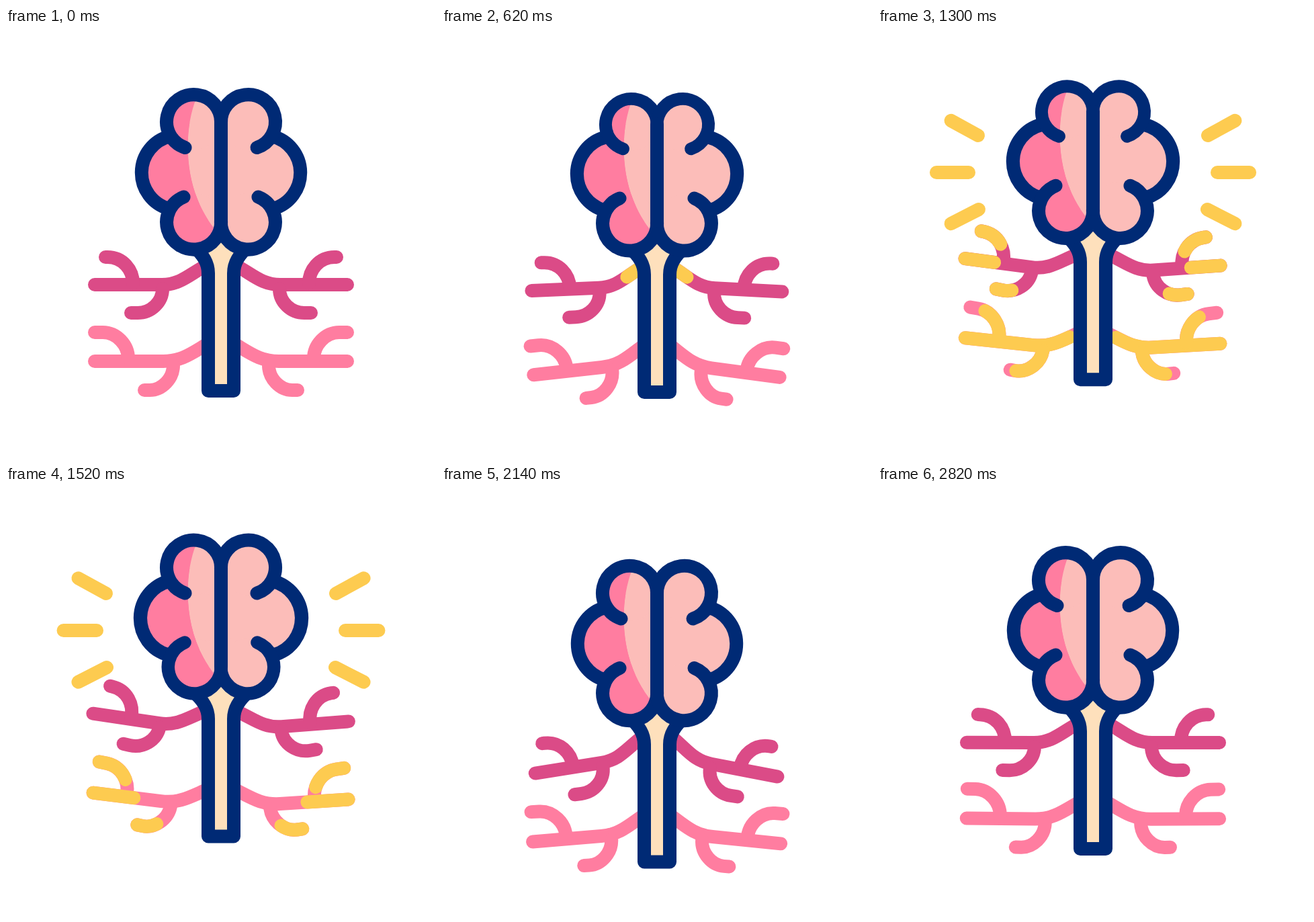
An HTML page for the animation above (3.2 s loop, 640 by 640 pixels).

```html
<!DOCTYPE html>
<html lang="en">
<head>
<meta charset="utf-8">
<title>Nervous system</title>
<style>
  html, body { margin: 0; height: 100%; overflow: hidden; background: #fff; }
  svg { display: block; width: 100vw; height: 100vh; }
  .line { fill: none; stroke-width: 20; stroke-linecap: round; stroke-linejoin: round; }
  .navy { stroke: #002a75; }
  .gold { stroke: #fdcb50; }
</style>
</head>
<body>
<svg viewBox="0 0 640 640">
  <defs>
    <clipPath id="shade"><path d="M150 80H290L283 105C263 155 263 245 314 303V350H150Z"/></clipPath>
    <g id="flesh">
      <path d="M262 141H320V286H262Z"/>
      <circle class="mid" cx="258" cy="215" r="56"/>
      <circle class="top" cx="279.5" cy="141" r="40.5"/>
      <circle class="low" cx="279.5" cy="286" r="40.5"/>
    </g>
    <g id="outline" class="line navy">
      <path class="mid" d="M244 161A56 56 0 0 0 242 269"/>
      <path class="top" d="M320 141A40.5 40.5 0 1 0 266.5 178"/>
      <path class="low" d="M320 286A40.5 40.5 0 1 1 264.5 251.5"/>
    </g>
  </defs>
  <g id="rays" class="line gold"></g>
  <g id="body">
    <g id="nerves" class="line"></g>
    <path d="M301 540V365C301 350 294 338 278 324L320 300L362 324C346 338 339 350 339 365V540Z" fill="#fee0bc"/>
    <path class="line navy" d="M278 324C294 338 301 350 301 365V540H339V365C339 350 346 338 362 324"/>
    <g fill="#fcbdb9">
      <use href="#flesh"/>
      <use href="#flesh" transform="matrix(-1 0 0 1 640 0)"/>
    </g>
    <use href="#flesh" fill="#ff7da0" clip-path="url(#shade)"/>
    <use href="#outline"/>
    <use href="#outline" transform="matrix(-1 0 0 1 640 0)"/>
    <path class="line navy" d="M320 141V286"/>
  </g>
</svg>
<script>
const LOOP = 3200;
const $ = id => document.getElementById(id);
const ramp = (t, from, span) => Math.min(1, Math.max(0, (t - from) / span));
const mirror = (flip, dy = 0) => flip ? `matrix(-1 0 0 1 640 ${dy})` : `translate(0 ${dy})`;
const rotate = (angle, x, y) => `rotate(${-angle * 180 / Math.PI} ${x} ${y})`;

function add(parent, tag, attrs = {}) {
  const node = document.createElementNS('http://www.w3.org/2000/svg', tag);
  for (const key in attrs) node.setAttribute(key, attrs[key]);
  return parent.appendChild(node);
}

// Smooth curve through [time, value] keys, flat at every turning point
function curve(keys) {
  const last = keys.length - 1;
  const slope = i => (keys[i + 1][1] - keys[i][1]) / (keys[i + 1][0] - keys[i][0]);
  const tangent = keys.map((_, i) => {
    if (i === 0 || i === last) return 0;
    const a = slope(i - 1), b = slope(i);
    return a * b > 0 ? 2 * a * b / (a + b) : 0;
  });
  return t => {
    if (t <= keys[0][0]) return keys[0][1];
    if (t >= keys[last][0]) return keys[last][1];
    const i = keys.findIndex(key => key[0] > t) - 1;
    const [[t0, a], [t1, b]] = [keys[i], keys[i + 1]];
    const h = t1 - t0, u = (t - t0) / h, v = 1 - u;
    return v * v * ((1 + 2 * u) * a + u * h * tangent[i])
         + u * u * ((1 + 2 * v) * b - v * h * tangent[i + 1]);
  };
}

// Dip, spring up, hang, drop and settle
const bob = curve([[220, 0], [430, 20], [620, 2], [1000, -12], [1300, -16.7],
                   [1760, -19.5], [2120, 20], [2390, -6], [2820, 0]]);

// Nerves trail the body; the right side swings less upward and more downward
function swing(t, { lag, sway }, flip) {
  const angle = sway * bob(t - lag);
  return flip ? angle * (angle < 0 ? .53 : 1.2) : angle;
}
const curl = t => Math.min(0, .005 * bob(t - 240));

// Strands: root x, root y, rest of the path, signal delay, signal travel time
const upper = {
  color: '#db4b87', dy: 0, start: 550, lag: 40, sway: .008,
  strands: [
    [302, 351, 'C272 367 260 382 232 382H132', 0, 400],
    [189, 380, 'C189 360 174 341 151 341h-3', 272, 320],
    [233, 388, 'C233 408 216 424 196 424h-10', 172, 370]
  ]
};
const lower = {
  color: '#ff7da0', dy: 114, start: 810, lag: 125, sway: .007,
  strands: [
    [302, 355, 'C276 370 262 382 234 382H132', 0, 400],
    [182, 378, 'C182 358 165 339 144 339h-12', 272, 320],
    [249, 388, 'C249 408 232 425 214 425h-8', 172, 370]
  ]
};

const nerves = [];
for (const kind of [upper, lower])
  for (const flip of [false, true]) {
    const side = add($('nerves'), 'g', { transform: mirror(flip, kind.dy) });
    const group = add(side, 'g');
    const draw = attrs => kind.strands.map(([x, y, d]) =>
      add(group, 'path', { d: `M${x} ${y}${d}`, ...attrs }));
    nerves.push({
      kind, flip, group,
      base: draw({ stroke: kind.color }),
      glow: draw({ class: 'gold', pathLength: 1 })
    });
  }

const rays = [];
for (const flip of [false, true])
  for (const [x, y, dx, dy] of [[149, 160, -42, -23], [135, 215, -50, 0], [150, 270, -43, 22]])
    rays.push({ x, y, dx, dy, node: add($('rays'), 'path', { transform: mirror(flip) }) });

function drawNerve({ kind, flip, group, base, glow }, t) {
  group.setAttribute('transform', rotate(swing(t, kind, flip), 300, 352));
  kind.strands.forEach(([x, y, , delay, span], i) => {
    const twig = i > 0;
    if (twig)
      for (const node of [base[i], glow[i]])
        node.setAttribute('transform', rotate(curl(t), x, y));
    const start = kind.start + delay + (twig && flip ? 20 : 0);
    const head = ramp(t, start, span);
    const tail = ramp(t, start + (twig ? 340 : 450), span);
    glow[i].style.display = head > tail ? '' : 'none';
    glow[i].setAttribute('stroke-dasharray', `${head - tail} 9`);
    glow[i].setAttribute('stroke-dashoffset', -tail);
  });
}

function scaleLobe(name, s, y) {
  for (const node of document.querySelectorAll('.' + name))
    node.setAttribute('transform', `translate(320 ${y}) scale(${s}) translate(-320 ${-y})`);
}

function drawBrain(t) {
  const beat = t > 450 && t < 1810 ? Math.cos((t - 620) / 680 * 2 * Math.PI) : 0;
  const up = Math.max(0, beat), down = Math.max(0, -beat);
  scaleLobe('top', 1 - .055 * up, 177);
  scaleLobe('mid', 1 + .008 * up + .034 * down, 215);
  scaleLobe('low', 1 - .06 * down, 250);
}

function drawRays(t) {
  const grow = t > 740 ? 1 - Math.exp((740 - t) / 172) : 0;
  const reach = grow * (1 - ramp(t, 1820, 240) ** 2);
  for (const { node, x, y, dx, dy } of rays)
    node.setAttribute('d', reach > 0 ? `M${x} ${y}l${dx * reach} ${dy * reach}` : '');
}

function tick() {
  const t = performance.now() % LOOP;
  $('body').setAttribute('transform', `translate(0 ${bob(t)})`);
  nerves.forEach(nerve => drawNerve(nerve, t));
  drawBrain(t);
  drawRays(t);
  requestAnimationFrame(tick);
}
tick();
</script>
</body>
</html>
```
